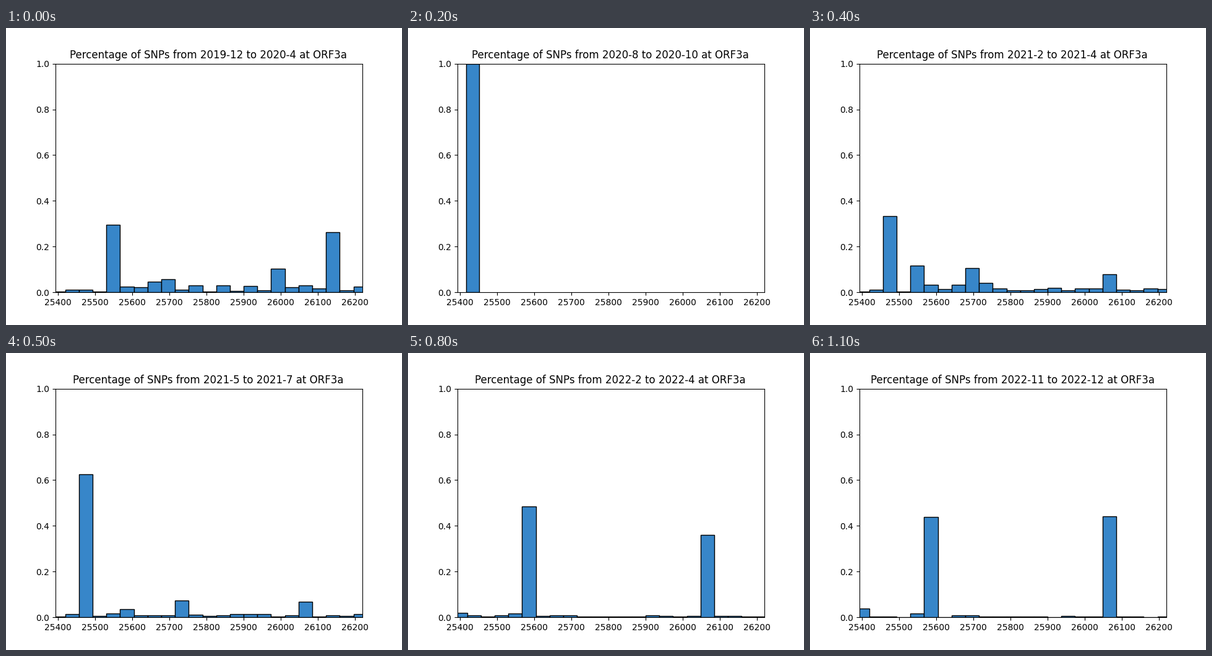
Recreate the animation shown at these times as a matplotlib script. Size 640 by 480 pixels, loop 1200 ms.

```python
import numpy as np
import matplotlib.pyplot as plt
from matplotlib.animation import FuncAnimation

PERIODS = 12
START, END = 25393, 26220
BINS = 23
BLUE = "#3786c9"
SINGLE = 2  # the period with all its SNPs in one bin

# Hotspot bins: key points (period, share), linear in between.
HOTSPOTS = {
    0: [(7, 0.003), (8, 0.019), (11, 0.038)],
    2: [(0, 0.011), (3, 0.043), (5, 0.625), (7, 0.36), (8, 0.003)],
    4: [(0, 0.295), (3, 0.216), (5, 0.016)],
    5: [(0, 0.024), (5, 0.035), (7, 0.3), (8, 0.484), (11, 0.438)],
    7: [(0, 0.046), (3, 0.06), (5, 0.008)],
    8: [(0, 0.057), (3, 0.203), (5, 0.008)],
    9: [(3, 0.011), (5, 0.073), (7, 0.057), (8, 0.003)],
    16: [(0, 0.103), (3, 0.032), (5, 0.003)],
    18: [(0, 0.03), (3, 0.092), (7, 0.043), (8, 0.36), (11, 0.441)],
    20: [(0, 0.262), (3, 0.011), (11, 0.003)],
}


def month(n):
    """Label of the n-th month counted from January 2020."""
    return f"{2020 + n // 12}-{n % 12 + 1}"


def title(period):
    first = 3 * period + 1 if period else -1
    last = min(3 * period + 3, 35)
    return f"Percentage of SNPs from {month(first)} to {month(last)} at ORF3a"


def shares(period):
    """Fading random background with the hotspots on top."""
    level = 0.02 * np.exp(-period / 6)
    heights = level * np.random.default_rng(period).uniform(0.2, 1.8, BINS)
    for k, points in HOTSPOTS.items():
        heights[k] = np.interp(period, *zip(*points))
    return heights


def histogram(period):
    """Left edges, bin width and heights for one period."""
    k = np.arange(BINS)
    if period == SINGLE:
        return 25416.4 + 35.5 * (k - 1), 35.5, (k == 1) * 1.0
    return 25419.14 + 36.99 * (k - 1), 36.99, shares(period)


fig, ax = plt.subplots(figsize=(6.4, 4.8), dpi=100)
bars = ax.bar(np.arange(BINS), np.zeros(BINS), align="edge",
              color=BLUE, edgecolor="black", linewidth=1)
ax.set_xlim(START, END)
ax.set_ylim(0, 1)


def draw(period):
    lefts, width, heights = histogram(period)
    for bar, x, h in zip(bars, lefts, heights):
        bar.set_bounds(x, 0, width, h)
        bar.set_visible(h > 0)
    ax.set_title(title(period), x=0.498)
    return bars


anim = FuncAnimation(fig, draw, frames=PERIODS, interval=100,
                     repeat=True, repeat_delay=0, blit=False)
plt.show()
```
